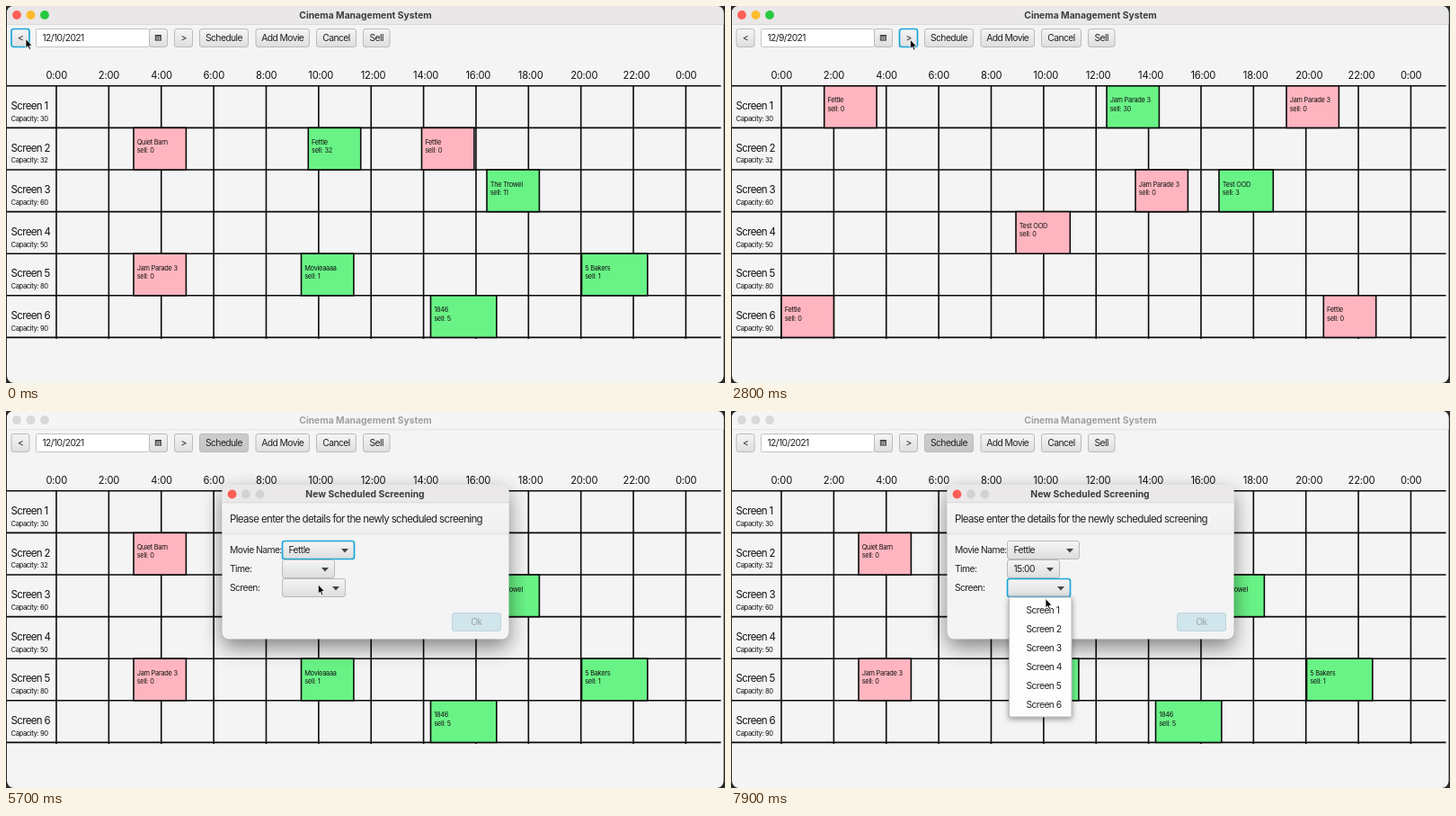
Animation of 800x419 px, one loop 8 s. Source, as an HTML page:

```html
<!DOCTYPE html>
<html lang="en">
<head>
<meta charset="utf-8">
<title>Cinema schedule</title>
<style>
html, body { margin: 0; width: 100%; height: 100%; overflow: hidden; background: #2a2a2a; }
svg { display: block; width: 100vw; height: 100vh; font-family: Inter, Roboto, sans-serif; }
.dialog { filter: drop-shadow(0 9px 11px #0007); }
.popup { filter: drop-shadow(0 2px 3px #0006); }
</style>
</head>
<body>
<svg id="stage" viewBox="0 0 800 419">
  <defs>
    <linearGradient id="up" x2="0" y2="1"><stop stop-color="#f5f5f5"/><stop offset="1" stop-color="#dedede"/></linearGradient>
    <linearGradient id="down" x2="0" y2="1"><stop stop-color="#cdcdcd"/><stop offset="1" stop-color="#c6c6c6"/></linearGradient>
    <linearGradient id="head" x2="0" y2="1"><stop stop-color="#f6f6f6"/><stop offset="1" stop-color="#efefef"/></linearGradient>
  </defs>
  <g id="scene"></g>
</svg>
<script>
const LOOP = 8000, STEP = 100;
const ROW = 46.6, TOP = 88.8, COL = 58.37, LEFT = 56;
const CAPACITY = [30, 32, 60, 50, 80, 90];
const LIGHTS = ['#fe5f57', '#febc2e', '#28c840'];
const MOVIES = ['Quiet Barn', 'Fettle', 'The Trowel', 'Jam Parade 3', '5 Bakers', '1846', 'The Grocer', 'Movieaaaa', 'Test OOD'];
const [BARN, FETTLE, TROWEL, JAM, BAKERS, YEAR, GROCER, PLAIN, TEST] = MOVIES.keys();
const LENGTH = { [BAKERS]: 73.3, [YEAR]: 73.3, [TEST]: 60.3 };
const HOURS = Array.from({ length: 24 }, (_, h) => String(h).padStart(2, '0') + ':00');
const SCREENS = CAPACITY.map((_, i) => 'Screen ' + (i + 1));

// Screenings per day: left edge, screen row, movie, tickets sold
const DAYS = {
  8: [[110, 1, YEAR, 0], [610.5, 1, YEAR, 0], [385.3, 2, FETTLE, 4], [371.3, 3, GROCER, 4],
      [590, 3, BAKERS, 0], [416.7, 4, FETTLE, 0], [584, 4, FETTLE, 0]],
  9: [[103.7, 0, FETTLE, 0], [418, 0, JAM, 30], [618, 0, JAM, 0], [450, 2, JAM, 0],
      [543, 2, TEST, 3], [317, 3, TEST, 0], [56, 5, FETTLE, 0], [659.3, 5, FETTLE, 0]],
  10: [[142, 1, BARN, 0], [336.3, 1, FETTLE, 32], [462.5, 1, FETTLE, 0], [535, 2, TROWEL, 11],
       [142, 4, BARN + JAM, 0], [328.5, 4, PLAIN, 1], [640.5, 4, BAKERS, 1], [472.5, 5, YEAR, 5]]
};

// Pointer path: time, x, y
const PATH = [
  [0, 22, 37], [300, 19, 38], [600, 18, 37], [1600, 18, 37], [2000, 17, 37], [2100, 17, 37],
  [2500, 199, 38], [3500, 201, 37], [3800, 201, 37], [4100, 244, 37], [4300, 244, 37],
  [4800, 358, 157], [5000, 358, 157], [5400, 345, 199], [5600, 345, 199], [5900, 354, 177],
  [6100, 354, 177], [6600, 348, 213], [6800, 348, 226], [6900, 348, 226], [7300, 350, 199],
  [7500, 350, 199], [7900, 350, 209], [8000, 350, 209]
];

function pointer(t) {
  const i = PATH.findIndex(k => k[0] > t);
  const [t0, x0, y0] = PATH[i - 1], [t1, x1, y1] = PATH[i];
  const u = (t - t0) / (t1 - t0), e = u * u * (3 - 2 * u);
  return [x0 + (x1 - x0) * e, y0 + (y1 - y0) * e];
}

const within = (t, a, b) => t >= a && t < b;

const rect = (x, y, w, h, fill, more = '') =>
  `<rect x="${x}" y="${y}" width="${w}" height="${h}" fill="${fill}" ${more}/>`;

// Text centred vertically on y
const text = (x, y, s, size = 10.3, fill = '#222', more = '') =>
  `<text x="${x}" y="${y + size * 0.36}" font-size="${size}" fill="${fill}" letter-spacing="-.055em" ${more}>${s}</text>`;

const caption = (x, y, s, fill) =>
  text(x, y, s, 10.3, fill, 'font-weight="700" text-anchor="middle" style="letter-spacing:0"');

const lights = (x, y, colors) =>
  colors.map((c, i) => `<circle cx="${x + i * 15.5}" cy="${y}" r="4.9" fill="${c}"/>`).join('');

function frame(x, y, w, h, focus, fill) {
  const ring = focus ? 'stroke="#1ba6d6" stroke-width="1.7"' : 'stroke="#bababa"';
  return rect(x + .5, y + .5, w - 1, h - 1, fill, `rx="2.5" ${ring}`);
}

const button = (x, w, label, focus, pressed) =>
  frame(x, 25, w, 21, focus, `url(#${pressed ? 'down' : 'up'})`) +
  text(x + w / 2, 35.5, label, 10.3, '#222', 'text-anchor="middle"');

function combo(y, w, label, value, focus) {
  const ax = 307 + w - 11;
  return text(249, y, label) + frame(307, y - 10.5, w, 21, focus, 'url(#up)') +
    text(314.5, y, value) +
    `<path d="M${ax - 4} ${y - 1.5}h8l-4 4.5z" fill="#444"/>`;
}

function popup(first, w, items, py) {
  const hot = Math.floor((py - first + 10.5) / 21);
  return `<g class="popup">` +
    rect(309.5, first - 14, w, items.length * 21 + 7, '#fdfdfd', 'stroke="#bdbdbd"') + '</g>' +
    items.map((s, i) => {
      const y = first + i * 21;
      return (i === hot ? rect(310.5, y - 10.5, w - 2, 21, '#0096c9') : '') +
        text(328.5, y, s, 10.3, i === hot ? '#fff' : '#222');
    }).join('');
}

function toolbar(t, day, modal) {
  const back = t < 2600;
  return button(5.5, 21, '&lt;', back, within(t, 900, 1300) || within(t, 1700, 2100)) +
    rect(33.5, 25.5, 126, 20, '#fff', 'rx="2" stroke="#c3c3c3"') +
    text(40.5, 35.5, `12/${day}/2021`) +
    frame(159, 25, 21, 21, false, 'url(#up)') +
    rect(165.8, 32, 7.2, 6.6, '#444') +
    '<path d="M166.5 34.4h6M166.5 36.5h6M168.2 33.8v4.2M170.6 33.8v4.2" stroke="#ddd" stroke-width=".6"/>' +
    button(187, 21, '&gt;', !back && !modal, within(t, 2600, 2700) || within(t, 3300, 3400)) +
    button(215, 55, 'Schedule', false, t >= 4200) +
    button(277.5, 60.5, 'Add Movie') + button(345, 45, 'Cancel') + button(397, 30.5, 'Sell');
}

function grid() {
  let lines = '', out = '';
  for (let i = 0; i <= 12; i++) {
    const x = LEFT + i * COL;
    lines += `M${x} ${TOP}V370`;
    out += text(x - 11.5, 76.7, `${i * 2 % 24}:00`, 11.2, '#111', 'style="letter-spacing:-.02em"');
  }
  for (let i = 0; i <= 6; i++) lines += `M1 ${TOP + i * ROW}H795.5`;
  SCREENS.forEach((s, i) => {
    const y = TOP + i * ROW;
    out += text(5.5, y + 22, s, 11.5, '#111') + text(5.5, y + 36.2, 'Capacity: ' + CAPACITY[i], 7.7, '#111');
  });
  return out + `<path d="${lines}" stroke="#0a0a0a" stroke-width="1.6"/>`;
}

function screening([x, row, movie, sold]) {
  const y = TOP + row * ROW, w = LENGTH[movie] || 58.4;
  return rect(x, y, w, ROW, sold ? '#69f386' : '#ffb5c0', 'stroke="#0a0a0a" stroke-width="1.6"') +
    text(x + 3.7, y + 16, MOVIES[movie], 7.4, '#111', 'style="letter-spacing:-.035em"') +
    text(x + 3.7, y + 25.2, 'sell: ' + sold, 7.4, '#111', 'style="letter-spacing:-.035em"');
}

function dialog(t, py) {
  const focus = t < 6000 ? 0 : t < 7500 ? 1 : 2;
  return '<g class="dialog">' + rect(240.5, 82, 319, 171.5, '#f4f4f4', 'rx="8"') + '</g>' +
    '<path d="M240.5 102V90q0-8 8-8h303q8 0 8 8v12z" fill="#eae8e8"/>' +
    rect(240.5, 102, 319, 34.5, 'url(#head)') +
    rect(240.5, 101.5, 319, .8, '#d3d1d1') + rect(240.5, 136.5, 319, .8, '#dedede') +
    lights(251.5, 92.5, ['#fe5f57', '#d3d2d2', '#d3d2d2']) +
    caption(399.5, 92.3, 'New Scheduled Screening', '#3c3c3c') +
    text(249, 119.5, 'Please enter the details for the newly scheduled screening', 11.5) +
    combo(154.5, 81, 'Movie Name:', t < 5500 ? '' : MOVIES[FETTLE], focus === 0) +
    combo(175.5, 59, 'Time:', t < 6900 ? '' : HOURS[15], focus === 1) +
    combo(196.5, 71, 'Screen:', '', focus === 2) +
    rect(496.5, 224.5, 54, 20, '#d0e5ec', 'rx="2.5" stroke="#c0d4db"') +
    text(523.5, 234.5, 'Ok', 10.3, '#98a5aa', 'text-anchor="middle"') +
    (within(t, 5000, 5500) ? popup(179, 80, MOVIES, py) : '') +
    (within(t, 6100, 6900) ? popup(-91, 57.5, HOURS, py) : '') +
    (t >= 7500 ? popup(221, 69.5, SCREENS, py) : '');
}

const arrow = (x, y) =>
  `<path transform="translate(${x} ${y})" d="M0-.5V9.8L2.3 7.7 3.9 11.4 5.6 10.7 4 7.1H7.2Z" fill="#000" stroke="#fff" stroke-width=".8"/>`;

function scene(t) {
  const day = t < 900 ? 10 : t < 1700 ? 9 : t < 2600 ? 8 : t < 3300 ? 9 : 10;
  const modal = t >= 4300;
  const [px, py] = pointer(t);
  return rect(1, 0, 797.5, 419, '#f4f4f4', 'rx="8"') +
    `<path d="M1 20V8q0-8 8-8h781.500q8 0 8 8v12z" fill="${modal ? '#f5f5f5' : '#e9e7e7'}"/>` +
    rect(1, 20, 797.5, .8, modal ? '#e2e2e2' : '#d2d0d0') +
    lights(12, 10, modal ? Array(3).fill('#d9d9d9') : LIGHTS) +
    caption(400, 10, 'Cinema Management System', modal ? '#a0a0a0' : '#3c3c3c') +
    toolbar(t, day, modal) + grid() + DAYS[day].map(screening).join('') +
    (modal ? dialog(t, py) : '') + arrow(px, py);
}

const view = document.getElementById('scene');
let shown = -1;
function tick() {
  const t = Math.floor(performance.now() % LOOP / STEP) * STEP;
  if (t !== shown) view.innerHTML = scene(shown = t);
  requestAnimationFrame(tick);
}
tick();
</script>
</body>
</html>
```
